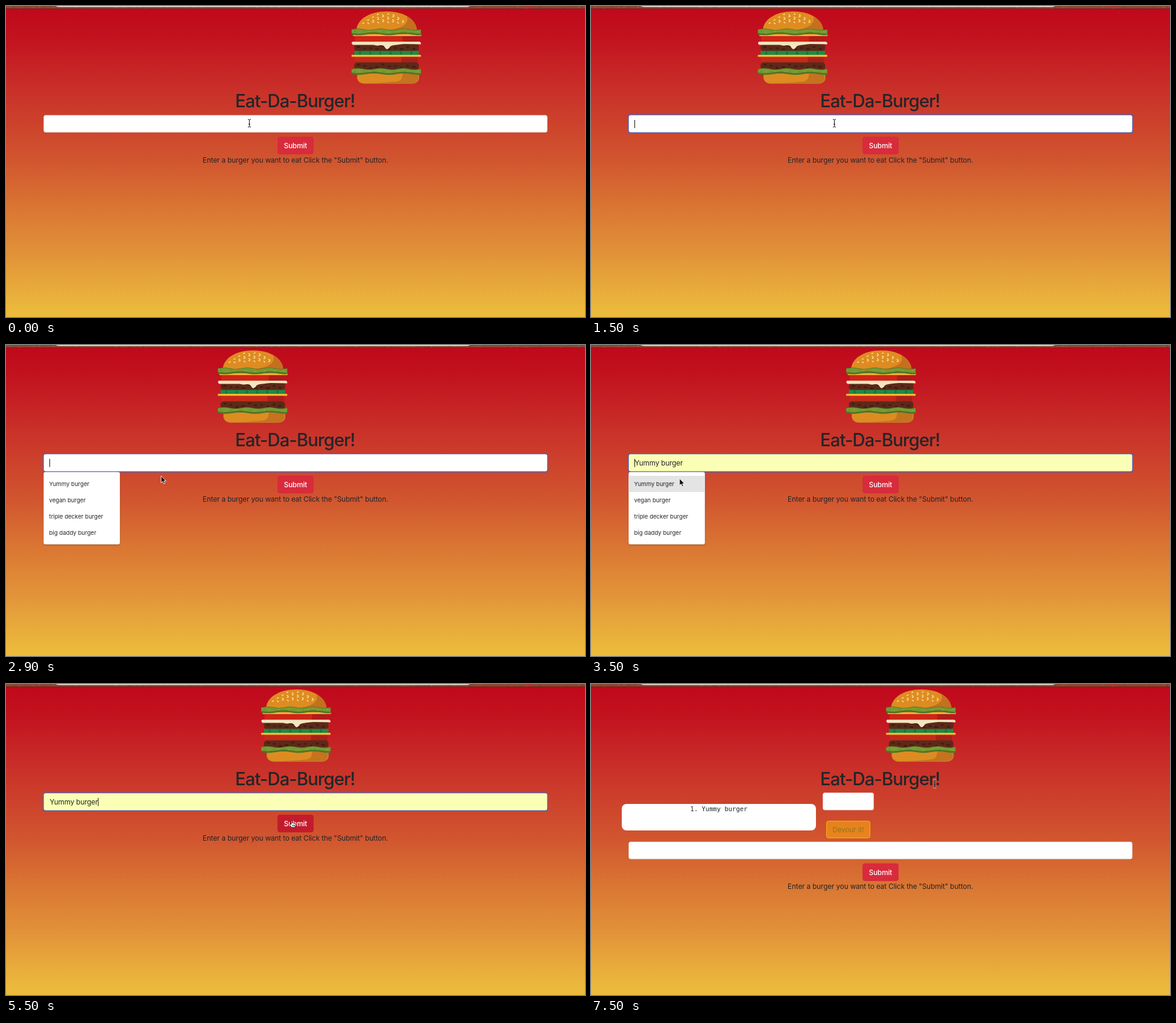
An HTML page for the animation above (7.6 s loop, 960 by 516 pixels).

```html
<!DOCTYPE html>
<html lang="en">
<head>
<meta charset="utf-8">
<title>Eat-Da-Burger!</title>
<style>
html, body { margin: 0; width: 100%; height: 100%; overflow: hidden; background: #c0081b; }
svg { display: block; width: 960px; height: 516px; }
text { font: 11.7px Inter, "Open Sans", sans-serif; letter-spacing: -.1px; fill: #212529; white-space: pre; }
.mid { text-anchor: middle; }
.title { font-size: 29.3px; font-weight: 500; letter-spacing: -.95px; }
.option { font-size: 9.6px; letter-spacing: 0; }
.mono { font: 10.5px "DejaVu Sans Mono", monospace; letter-spacing: 0; }
.field { fill: #fff; stroke: #e6d8d6; stroke-width: .7; }
</style>
</head>
<body>
<svg id="stage" viewBox="0 0 960 516"></svg>
<script>
const LOOP = 7600, RELOAD = 6400;
const FOCUS = 1420, OPEN = 1900, PREVIEW = 3080, PICK = 4050;
const HOVER_SUBMIT = 5230, HOVER_DEVOUR = 6930, LEAVE_DEVOUR = 7420;

let seed = 7;
const random = () => (seed = (seed * 16807) % 2147483647) / 2147483647;
const times = (n, make) => Array.from({ length: n }, (_, i) => make(i)).join('');
const rect = (x, y, w, h, fill, r = 0, extra = '') =>
  `<rect x="${x}" y="${y}" width="${w}" height="${h}" rx="${r}" fill="${fill}" ${extra}/>`;
const path = (d, fill, extra = '') => `<path d="${d}" fill="${fill}" ${extra}/>`;

// Wavy band across the burger; x runs from -58 to 58.
function leaf(y, h, fill) {
  const top = [], bottom = [];
  for (let x = -57.5; x <= 57.5; x += 2.5) {
    top.push(`${x} ${(y + 1.1 * Math.sin(x / 6)).toFixed(1)}`);
    bottom.unshift(`${x} ${(y + h + 1.2 * Math.sin(x / 8 + 1)).toFixed(1)}`);
  }
  return path(`M${top.join('L')}L${bottom.join('L')}Z`, fill);
}

const lettuce = y => leaf(y, 8.8, '#4f7424') + leaf(y + .8, 5.2, '#779a33') +
  times(14, i => `<circle cx="${-52 + i * 8}" cy="${y + 3 + random() * 3}" r=".9" fill="${i % 2 ? '#94ac48' : '#5f8629'}"/>`);

const patty = (y, h) => rect(-53, y, 107, h, '#5c2919', 5) +
  times(10, i => `<ellipse cx="${-46 + i * 10.2}" cy="${y + 3 + random() * (h - 6)}" rx="${2 + random() * 1.5}" ry="1.6" fill="#451b12"/>`);

// Rows of sesame that widen down the dome.
const sesame = times(4, row => {
  const count = 4 + row * 2, half = 13 + row * 8;
  return times(count, i => {
    const x = -half + 2 * half * i / (count - 1) - 1;
    const y = 13.5 + row * 4 + (i % 2) * 1.5 + x * x / 500;
    return x > 35 ? '' :
      `<ellipse cx="${x.toFixed(1)}" cy="${y.toFixed(1)}" rx="1.9" ry=".9" fill="#f7dd98" transform="rotate(${i % 2 ? 40 : -25} ${x} ${y})"/>`;
  });
});

const burger = [
  path('M-49.5 41C-49 22-28 9 1 9C31 9 50 23 51 41Z', '#de8c21'),
  path('M34 17C46 23 50.5 32 51 41H-5C22 39 40 31 34 17Z', '#c4701f'),
  sesame,
  rect(-52, 50, 104, 10, '#cf2617'), rect(27, 50, 25, 10, '#b01d19'),
  rect(-55, 46.5, 113, 3.4, '#f3b533'),
  lettuce(38.6),
  patty(62.5, 12.5),
  path('M-56 59.3H55Q58 60 57.5 63.5L30 63Q18 64 10 65.5Q6 66.5 5 69.5Q1 74-2 69Q-4 64.5-10 65Q-16 66.5-21 64.5L-55 64.5Q-59 62-56 59.3Z', '#f4e6c0'),
  rect(-53, 74.5, 107, 7, '#1f8a45'),
  times(6, i => rect(-45 + i * 17, 75, 3, 6, '#18753b')),
  rect(-52, 84, 104, 10, '#c52a18'), rect(25, 84, 27, 10, '#a8201a'),
  rect(-57.5, 81, 115, 3.3, '#f5b935'),
  patty(93.5, 12.5),
  path('M-48 112H54V120Q53 128.6 42 128.6H-36Q-46 128.6-48 120Z', '#dd8c21', 'stroke="#cb8a3d" stroke-width=".6"'),
  path('M27 112H53V120Q52 128 42 128.3H-34Q14 127 22 124Q27 121 27 112Z', '#c4731f'),
  lettuce(104.2)
].join('');

const stops = [[0, '#c0081b'], [.1, '#c2121f'], [.27, '#c93029'], [.5, '#d1562f'],
  [.65, '#da7633'], [.8, '#e29339'], [.97, '#ebb83c'], [1, '#ecbb3c']];
const options = ['Yummy burger', 'vegan burger', 'triple decker burger', 'big daddy burger'];

document.getElementById('stage').innerHTML = `
<defs>
  <linearGradient id="sky" x2="0" y2="1">${stops.map(([o, c]) => `<stop offset="${o}" stop-color="${c}"/>`).join('')}</linearGradient>
  <filter id="soft" x="-10%" y="-10%" width="120%" height="125%"><feDropShadow dx="0" dy="1" stdDeviation="1.2" flood-opacity=".3"/></filter>
</defs>
${rect(0, 0, 960, 516, 'url(#sky)')}
${rect(0, 0, 960, 4.6, '#8a4930')}
${times(130, () => rect((random() * 960).toFixed(), (random() * 3.6).toFixed(1), 3, 1, random() < .5 ? '#9b5f42' : '#75402d'))}
${path('M82 0H770Q767 1.6 762 1.6H90Q85 1.6 82 0Z', '#f4efec')}
${rect(862, 0, 10, 1.2, '#c8202a')}
${rect(0, 4.2, 960, 1, '#7d1a20')}
<g id="burger">${burger}</g>
<text class="mid title" x="479.3" y="167.9">Eat-Da-Burger!</text>
<g id="list">
  ${rect(51, 199, 322, 44, '#fff', 8)}
  <text class="mid mono" x="212" y="210.8">1. Yummy burger</text>
  <rect class="field" x="384.6" y="180.6" width="84" height="28.5" rx="3"/>
  ${rect(390.6, 227.4, 72, 28, '#ffc107', 3, 'id="devour" stroke="#f8b412" stroke-width="1"')}
  <text id="devourText" class="mid" x="426.5" y="245.8">Devour it!</text>
</g>
<g id="form">
  ${rect(60.8, 179.4, 838.2, 32, '#665c9f', 4, 'id="ring"')}
  <rect id="input" class="field" x="62.7" y="181.3" width="834.6" height="28.2" rx="3"/>
  <text id="value" x="72.4" y="200.2">Yummy burger</text>
  ${rect(72, 189, 1, 13.5, '#111', 0, 'id="caret"')}
  ${rect(450.8, 217.4, 58.6, 28.2, '#d82b3c', 3, 'id="submit" stroke-width="1"')}
  <text class="mid" x="480" y="236.2" style="fill:#fff;font-weight:500">Submit</text>
  <text class="mid" x="479.8" y="259.6">Enter a burger you want to eat Click the "Submit" button.</text>
</g>
<g id="menu">
  ${rect(62.4, 210.8, 126.4, 120, '#fff', 3, 'filter="url(#soft)"')}
  ${rect(62.4, 217, 126.4, 27, '#e4e4e5', 0, 'id="row"')}
  ${options.map((name, i) => `<text class="option" x="71.5" y="${234 + i * 27}">${name}</text>`).join('')}
</g>
<g id="status">${rect(-4, 514, 321, 6, '#8b6d34', 2)}</g>
<g id="cursor">
  <g id="beam" fill="none">
    <path d="M-2.5-6.5Q0-6.5 0-5V5Q0 6.5-2.5 6.5M2.5-6.5Q0-6.5 0-5V5Q0 6.5 2.5 6.5M-1.5 1.5H1.5" stroke="#fff" stroke-width="2.4" opacity=".75"/>
    <path d="M-2.5-6.5Q0-6.5 0-5V5Q0 6.5-2.5 6.5M2.5-6.5Q0-6.5 0-5V5Q0 6.5 2.5 6.5M-1.5 1.5H1.5" stroke="#111"/>
  </g>
  <path id="arrow" d="M0 0V11.5L2.6 9.2L4.5 13.2L6.5 12.3L4.7 8.5H8.2Z" fill="#111" stroke="#fff" stroke-width=".9"/>
  <path id="hand" d="M-2.6 1V-4.6Q-1.7-6.4-.7-4.6V-1.3Q.5-2.5 1.4-1Q2.8-1.8 3.4-.3Q5-.7 5 1.2V2.5L3.6 6H-2.2L-5 2Q-5.2.1-3.6.5ZM-.3 1.5V4M1.4 1.5V4M3 1.5V4" fill="#fff" stroke="#111" stroke-width=".9"/>
</g>`;

const el = id => document.getElementById(id);
const show = (id, on) => { el(id).style.display = on ? '' : 'none'; };
const clamp = v => Math.min(1, Math.max(0, v));
const mix = (a, b, k) => `rgb(${a.map((v, i) => Math.round(v + (b[i] - v) * k))})`;

// cubic-bezier(.42, 0, .58, 1)
function easeInOut(x) {
  let lo = 0, hi = 1;
  for (let i = 0; i < 24; i++) {
    const s = (lo + hi) / 2, r = 1 - s;
    if (1.26 * s * r * r + 1.74 * s * s * r + s * s * s < x) lo = s; else hi = s;
  }
  return lo * lo * (3 - 2 * lo);
}

// The burger sweeps right to left, then settles in the centre.
function swing(age, sweep) {
  const reach = 204.5;
  return age < sweep
    ? reach * (1 - 2 * easeInOut(clamp(age / sweep)))
    : -reach * (1 - easeInOut(clamp((age - sweep) / 1000)));
}

const pointer = [
  [0, 403.5, 194.5, 'beam'], [2550, 403.5, 194.5, 'beam'], [2800, 285, 216, 'arrow'], [3150, 146.8, 221.5, 'arrow'],
  [4150, 146.8, 221.5, 'arrow'], [4820, 350, 334, 'arrow'], [4950, 400, 334, 'arrow'],
  [HOVER_SUBMIT, 470, 243, 'hand'], [5350, 475.5, 232, 'hand'], [6750, 475.5, 232, 'hand'],
  [HOVER_DEVOUR, 440, 241, 'hand'], [7360, 440, 241, 'hand'], [LEAVE_DEVOUR, 500, 205, 'arrow'], [7500, 570, 165.5, 'beam']
];

function drawPointer(t) {
  const i = pointer.findLastIndex(key => key[0] <= t);
  const [t0, x0, y0, kind] = pointer[i], [t1, x1, y1] = pointer[i + 1] || [LOOP, x0, y0];
  const u = clamp((t - t0) / (t1 - t0)), k = u * u * (3 - 2 * u);
  el('cursor').setAttribute('transform', `translate(${x0 + (x1 - x0) * k} ${y0 + (y1 - y0) * k})`);
  for (const name of ['beam', 'arrow', 'hand']) show(name, name === kind);
}

function draw(t) {
  const reloaded = t >= RELOAD, focused = t >= FOCUS && !reloaded;
  const filled = t >= PREVIEW && !reloaded, picked = t >= PICK;
  const offset = reloaded ? swing(t - 6409, 2704) : swing(t + 787, 3100);
  el('burger').setAttribute('transform', `translate(${480.6 + offset} 0)`);
  el('form').setAttribute('transform', `translate(0 ${reloaded ? 80.7 : 0})`);

  show('ring', focused);
  show('value', filled);
  el('input').style.fill = filled ? '#faffb5' : '#fff';
  el('input').style.stroke = focused ? 'none' : '';
  show('caret', focused && Math.floor((t - (picked ? PICK : FOCUS)) / 500) % 2 === 0);
  el('caret').setAttribute('x', picked ? 152.4 : 72);
  show('menu', t >= OPEN && !picked);
  show('row', filled);

  const hover = t >= HOVER_SUBMIT && !reloaded;
  el('submit').setAttribute('fill', hover ? '#c41b2c' : '#d82b3c');
  el('submit').setAttribute('stroke', hover ? '#b91c2a' : '#d62a3a');

  show('list', reloaded);
  const glow = clamp((t - HOVER_DEVOUR) / 150) - clamp((t - LEAVE_DEVOUR) / 150);
  el('devour').setAttribute('fill-opacity', glow);
  el('devourText').style.fill = mix([248, 180, 18], [33, 37, 41], glow);
  show('status', t >= 6000 && t < 6900);
  drawPointer(t);
}

const start = performance.now();
function tick() {
  draw((performance.now() - start) % LOOP);
  requestAnimationFrame(tick);
}
tick();
</script>
</body>
</html>
```
